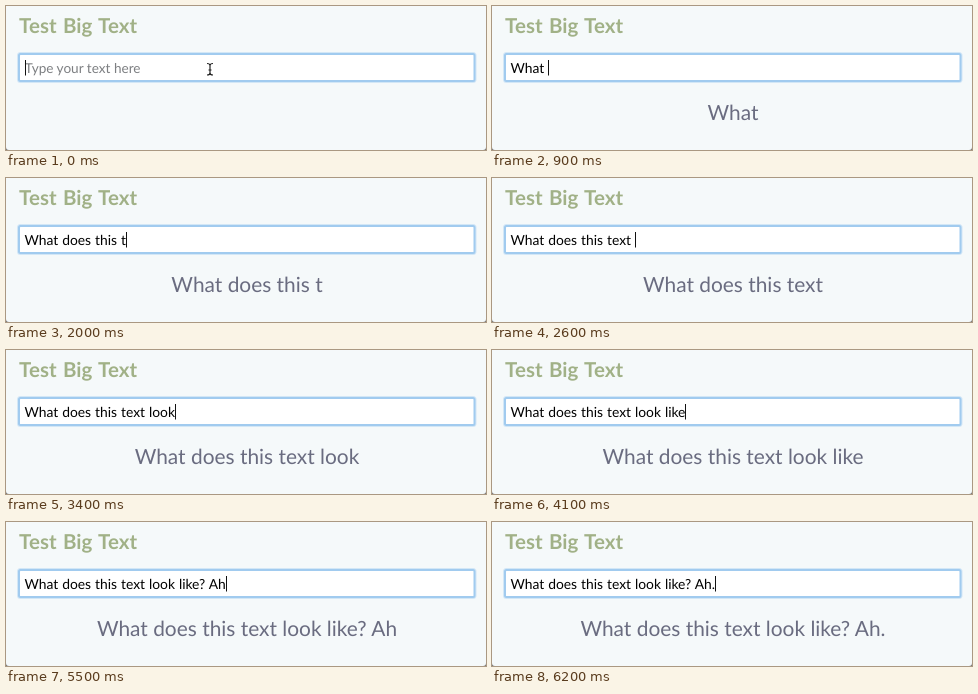
Animation of 480x144 px, one loop 6.6 s. Source, as an HTML page:

```html
<!DOCTYPE html>
<html lang="en">
<head>
<meta charset="utf-8">
<style>
  html, body { margin: 0; width: 480px; height: 144px; overflow: hidden; background: #f5f9fa; }
  svg { display: block; font-family: Lato, Muli, sans-serif; }
  text { white-space: pre; text-rendering: geometricPrecision; }
  .title { font-weight: 700; font-size: 20.5px; letter-spacing: .1px; word-spacing: 1px; fill: #a1b187; }
  .field { font-size: 13.85px; word-spacing: .4px; fill: #000; }
  .hint { font-size: 13.6px; fill: #7d7f82; }
  .big { font-size: 20.9px; fill: #6a6c80; text-anchor: middle; }
</style>
</head>
<body>
<svg width="480" height="144" viewBox="0 0 480 144">
  <path d="M0 141V144H3Q0 144 0 141M480 141V144H477Q480 144 480 141" fill="#777"/>
  <text class="title" x="13" y="26.6">Test Big Text</text>
  <rect x="13" y="48" width="455.5" height="27" rx="1.5" fill="none" stroke="#a1cbef" stroke-width="4" opacity=".4"/>
  <rect x="13" y="48" width="455.5" height="27" rx="1.5" fill="#fff" stroke="#a1cbef" stroke-width="2"/>
  <g id="idle">
    <text class="hint" x="18.8" y="66.5">Type your text here</text>
    <path d="M201 57.5Q204 57.5 204 59.5Q204 57.5 207 57.5M204 59V67M201 69Q204 69 204 67Q204 69 207 69M202.5 64H205.5"
      fill="none" stroke="#222" stroke-width="1.2"/>
  </g>
  <text id="field" class="field" x="18.5" y="66.5"></text>
  <rect id="caret" y="54" width="1" height="15.5" fill="#111"/>
  <text id="big" class="big" x="241" y="114.2"></text>
</svg>
<script>
  const LOOP = 6600, BLINK = 500;
  const message = "What does this text look like? Ah.";
  // Time of each keystroke, in tenths of a second
  const keys = [5, 6, 7, 8, 9, 10, 11, 12, 14, 15, 16, 17, 18, 19, 19, 20, 21, 23, 25, 26,
    30, 32, 33, 34, 35, 37, 39, 40, 41, 43, 48, 50, 52, 62].map(k => k * 100);
  const [idle, field, caret, big] = ["idle", "field", "caret", "big"].map(id => document.getElementById(id));
  const start = performance.now();
  let shown = -1;

  function draw() {
    const t = (performance.now() - start) % LOOP;
    const count = keys.filter(k => k <= t).length;
    if (count !== shown) {
      shown = count;
      const typed = message.slice(0, count);
      field.textContent = typed;
      big.textContent = typed.trim();
      idle.style.display = count ? "none" : "";
      caret.setAttribute("x", Math.round(18.5 + (count ? field.getComputedTextLength() : 0)));
    }
    const sinceKey = count ? t - keys[count - 1] : 0;
    caret.style.display = sinceKey < BLINK ? "" : "none";
    requestAnimationFrame(draw);
  }
  draw();
</script>
</body>
</html>
```
